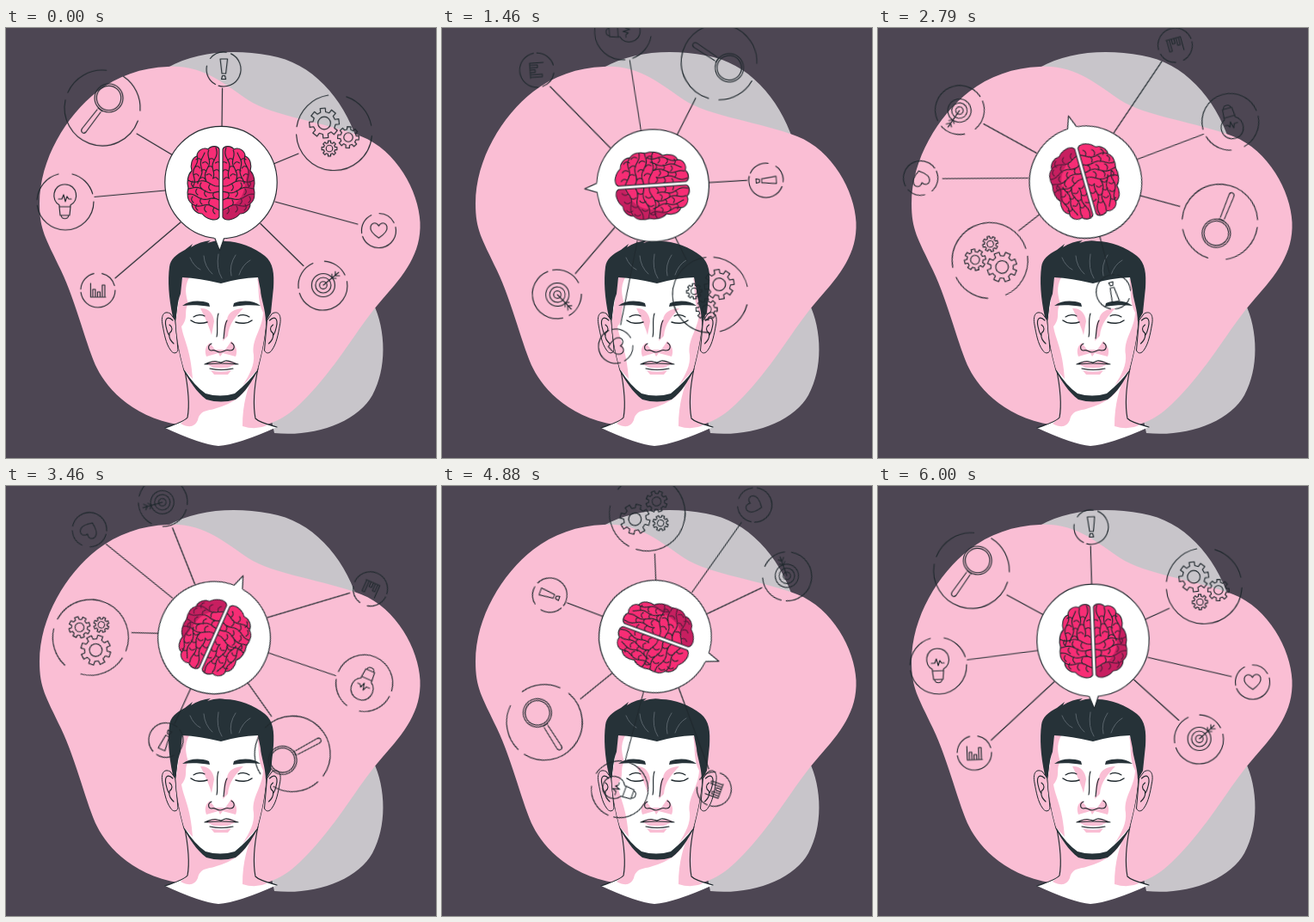
These frames come from a looping animation (500 by 500 pixels, 6040 ms). An HTML page:

```html
<!DOCTYPE html>
<html lang="en">
<head>
<meta charset="utf-8">
<title>Mind map</title>
<style>
html, body { margin: 0; width: 100%; height: 100%; overflow: hidden; background: #4d4653; }
svg { display: block; width: 100vw; height: 100vh; }
.line, .skin, .lobe { stroke: #1f282d; stroke-width: 1.15; stroke-linecap: round; stroke-linejoin: round; }
.line { fill: none; }
.skin { fill: #fff; }
.dark { fill: #263238; }
.pink { fill: #fabed4; }
.lobe { fill: #f72d75; }
.strand { fill: none; stroke: #667078; stroke-width: .8; stroke-linecap: round; }
#orbit { transform-origin: 245.7px 178.8px; animation: spin 6040ms linear infinite; }
@keyframes spin {
  0% { transform: rotate(0deg); }
  72.52% { transform: rotate(258.1deg); }
  88.25% { transform: rotate(318.9deg); }
  100% { transform: rotate(360deg); }
}
</style>
</head>
<body>
<svg viewBox="0 0 500 500">
  <defs>
    <path id="lobe" d="M248 141C246 136 238 137 235 141C229 138 222 143 222 149C216 151 214 159 216 166C211 171 210 180 212 186C210 193 211 201 216 204C216 211 222 216 228 216C233 222 244 226 248 220Z"/>
    <clipPath id="inLobe"><use href="#lobe"/></clipPath>
    <g id="side">
      <path class="pink" stroke="#1f282d" d="M191 332C183 328 180 335 182 345C184 356 186 367 191 374C194 379 198 379 200 375L197 340Z"/>
      <path class="line" d="M194 340C188 334 184 338 186 347S188 354 190 358M190 345C194 348 194 352 190 355C189 361 192 364 195 367"/>
    </g>
    <g id="eye">
      <path class="dark" d="M205 323C213 317 225 316 236 320L237 324C225 322 214 322 205 323Z"/>
      <path class="line" d="M218 336C222 333 228 333 231 335"/>
      <path class="line" style="stroke-width:1.5" d="M215 340C220 344 228 344 234 342"/>
    </g>
  </defs>

  <path fill="#c8c5ca" d="M188 46C220 28 263 24 307 32C356 40 392 82 408 130L427 320C442 352 443 396 426 427S359 476 312 471L230 80Z"/>
  <path class="pink" d="M188 45C229 42 255 66 282 84S372 110 413 126S480 190 481.500 226S463 287 438 315S391 383 361 417S318 457 297 463H214C150 457 118 420 106 396S82 320 64 282S39 235 39 204C39 153 70 102 106 74C129 56 158 46 188 45Z"/>

  <!-- bust -->
  <path fill="#fff" d="M207 390C212 416 214 435 211 453C207 458 196 461 185 465Q226 484 247 486Q271 484 315 464C305 461 295 459 290 454C287 436 289 420 293 392Z"/>
  <path class="pink" d="M287 405C281 418 275 437 275 463Q290 468 304 462L290 454C287 436 289 420 293 392Z"/>
  <path class="pink" d="M207 396C211 413 214 434 211 453L203 460Q218 468 223 456C226 443 235 446 248 441C265 436 280 425 288 405L248 420Z"/>
  <path class="line" d="M207 394C212 418 214 437 211 453C207 458 196 461 185 465M293 396C288 420 287 438 290 454C295 459 305 461 315 464"/>
  <use href="#side"/>
  <use href="#side" transform="matrix(-1 0 0 1 500.500 0)"/>

  <path class="skin" d="M203 286C201 305 198 324 197 340C198 360 202 380 207 398C215 413 229 430 245 433C267 432 283 415 292 399C297 380 302 358 303 336L295 286Z"/>
  <path class="pink" d="M205 290H213C207 302 209 310 212 321C206 329 213 337 204 347C206 361 215 374 217 408L207 397C202 380 198 360 197.500 340Z"/>
  <path class="pink" d="M292 290C295 307 292 318 299 331C298 351 285 362 288 380C289 392 284 402 275 416L292 398C297 380 302 358 302.500 336L298 300Z"/>
  <path class="pink" d="M226 326C234 325 241 331 242 341L239 357Q235 343 226 326Z"/>
  <path class="pink" d="M276 326C266 326 258 331 257 339C251 344 255 355 252 364L258 358C259 344 268 334 276 326Z"/>
  <path class="pink" d="M237 366C231 371 231 376 233 382L247 378L249 382L252 378L267 382C270 375 267 369 262 364L255 374H243Z"/>
  <path class="pink" d="M232 390L241 387L250 389L261 387L269 390L258 395H241ZM238 398Q250 401 262 398L258 403H242Z"/>
  <path class="dark" d="M207 397Q219 416 232 425Q249 430 266 425Q283 411 292 398C287 410 278 424 267 432Q250 437 233 432C221 423 213 410 207 397Z"/>
  <use href="#eye"/>
  <use href="#eye" transform="matrix(-1 0 0 1 501 0)"/>
  <path class="line" d="M247 332C244 340 247 350 245 359M257 340C254 345 254 353 253 361M239 367C234 369 235 375 239 375C243 373 244 377 249 377S255 373 260 375C266 375 267 369 262 366M231 391C237 389 241 386 246 388L250 389L255 387C260 386 264 390 270 391M233 391Q250 389 268 391M237 396Q250 399 264 396"/>
  <path class="dark" d="M194 336C189 313 188 293 190 278C191 269 198 263 208 258L217 251L215 255Q226 248 238 247L234 250Q245 246 255 248C270 248 289 255 301 265C311 273 312 286 311 302L308 331L302 342C302 327 296 313 296 305L293 290Q270 291 250 297Q225 291 205 290L203 309C199 319 199 329 197 341Z"/>
  <path class="strand" d="M214 267Q218 277 226 281M230 265Q231 278 240 286M247 263Q244 280 251 291M267 264Q259 276 262 288M284 270Q275 275 271 287"/>

  <g id="orbit">
    <g id="icons" class="line">
      <path d="M251.500 70L251 115M152 123L194 148M103 196.500L185 189M127 291L203 226M340 146L311 158M409 228L313 202M346 276.500L296 227.500"/>
      <path d="M249 36H257.500L255.500 53H251ZM250.500 59.500L251.500 55.500H254.500L255.500 59.500Z"/>
      <path d="M106 95L88.500 117C86 121 90 124 93 121L110 98M107 93L112 97"/>
      <path d="M62 206C52 201 54 182 68.500 182S86 201 75 206V208H62ZM62 208L63 218H74L75 208M64 218C65 223 72 223 73 218M61 199H65L67 194L69 202L71 196L73 199H76"/>
      <path d="M98.500 297V313H116M101 312V304H104V312M106.500 312V307H109.500V312M112 312V299H115V312"/>
      <path d="M433.500 244C426 239 423 235 424 231C425 226 431 225 433.500 230C436 225 442 226 443 231C444 235 441 239 433.500 244Z"/>
      <path d="M369 299L387 284M379 291V286M383 288V283M379 291H384M383 288H388"/>
    </g>
    <circle class="skin" cx="250" cy="179.500" r="65.200"/>
    <path class="skin" d="M242.500 243.500L248.500 259L254 243.500"/>
    <path fill="#fff" d="M242 241H255V244.200H242Z"/>
    <g id="half">
      <use href="#lobe" class="lobe"/>
      <path id="folds" class="line" clip-path="url(#inLobe)"/>
    </g>
    <g transform="matrix(-1 0 0 1 500 0)">
      <use href="#half"/>
      <path clip-path="url(#inLobe)" fill="#8c0f48" opacity=".45" d="M210 160L219 166C222 180 222 192 229 200Q238 210 249 213V226H210Z"/>
    </g>
  </g>
</svg>
<script>
const icons = document.getElementById('icons');

function add(tag, attrs) {
  const el = document.createElementNS('http://www.w3.org/2000/svg', tag);
  for (const key in attrs) el.setAttribute(key, attrs[key]);
  icons.append(el);
}

const circle = (cx, cy, r) => add('circle', { cx, cy, r });

function polar(x, y, r, deg) {
  const a = deg * Math.PI / 180;
  return `${x + r * Math.cos(a)} ${y + r * Math.sin(a)}`;
}

// Every ring shares one dash pattern, turned by its own angle
function ring(cx, cy, r, turn) {
  add('circle', {
    cx, cy, r, pathLength: 360, 'stroke-dasharray': '172 12 72 28 60 16',
    transform: `rotate(${turn} ${cx} ${cy})`
  });
}

function gear(x, y, r, turn) {
  const points = [];
  for (let a = turn; a < turn + 360; a += 45) {
    points.push(polar(x, y, r * .75, a - 13), polar(x, y, r, a - 10),
      polar(x, y, r, a + 10), polar(x, y, r * .75, a + 13));
  }
  add('path', { d: `M${points.join('L')}Z` });
  circle(x, y, r * .42);
}

ring(253, 48, 20, -65);
ring(112, 93, 44, 20);
ring(69, 202, 33, 0);
ring(107, 305, 20, 0);
ring(381.5, 121.5, 44, 5);
ring(433.5, 235.5, 20, -12);
ring(368.5, 299.5, 28.5, -10);

gear(370, 110.5, 17.5, -6);
gear(398, 127, 12.5, 4);
gear(376, 140, 9, 0);

for (const r of [16.5, 14.2]) circle(119.5, 81.5, r);
for (const r of [13.5, 9, 4.3]) circle(369, 299, r);

// Brain folds: steep furrows above, sloping ones below, joined by short links
function furrow(x, y, dx, dy, sway, phase) {
  const points = [];
  for (let t = 0; t <= 1.001; t += .05) {
    const s = sway * Math.sin(t * 9 + phase);
    points.push(`${x + dx * t + (dy > dx ? s : 0)} ${y + dy * t + (dy > dx ? 0 : s)}`);
  }
  return 'M' + points.join('L');
}

let folds = '';
for (let i = 0; i < 4; i++) {
  const x = 222 + i * 7.5;
  const y = 183 + i * 9;
  folds += furrow(x, 139 + (3 - i) * 3, -5, 36, 1.6, i * 2);
  folds += furrow(210, y - 7, 39, 7, 1.8, i * 1.7);
  for (let j = 0; j < 3; j++) {
    folds += `M${x - 1 - j * 1.5} ${153 + j * 9 + i % 2 * 4}q4 -3 6 1`;
    folds += `M${217 + j * 10 + i % 2 * 5} ${y - 5 + j * 2}q-3 4 1 7`;
  }
}
document.getElementById('folds').setAttribute('d', folds);
</script>
</body>
</html>
```
